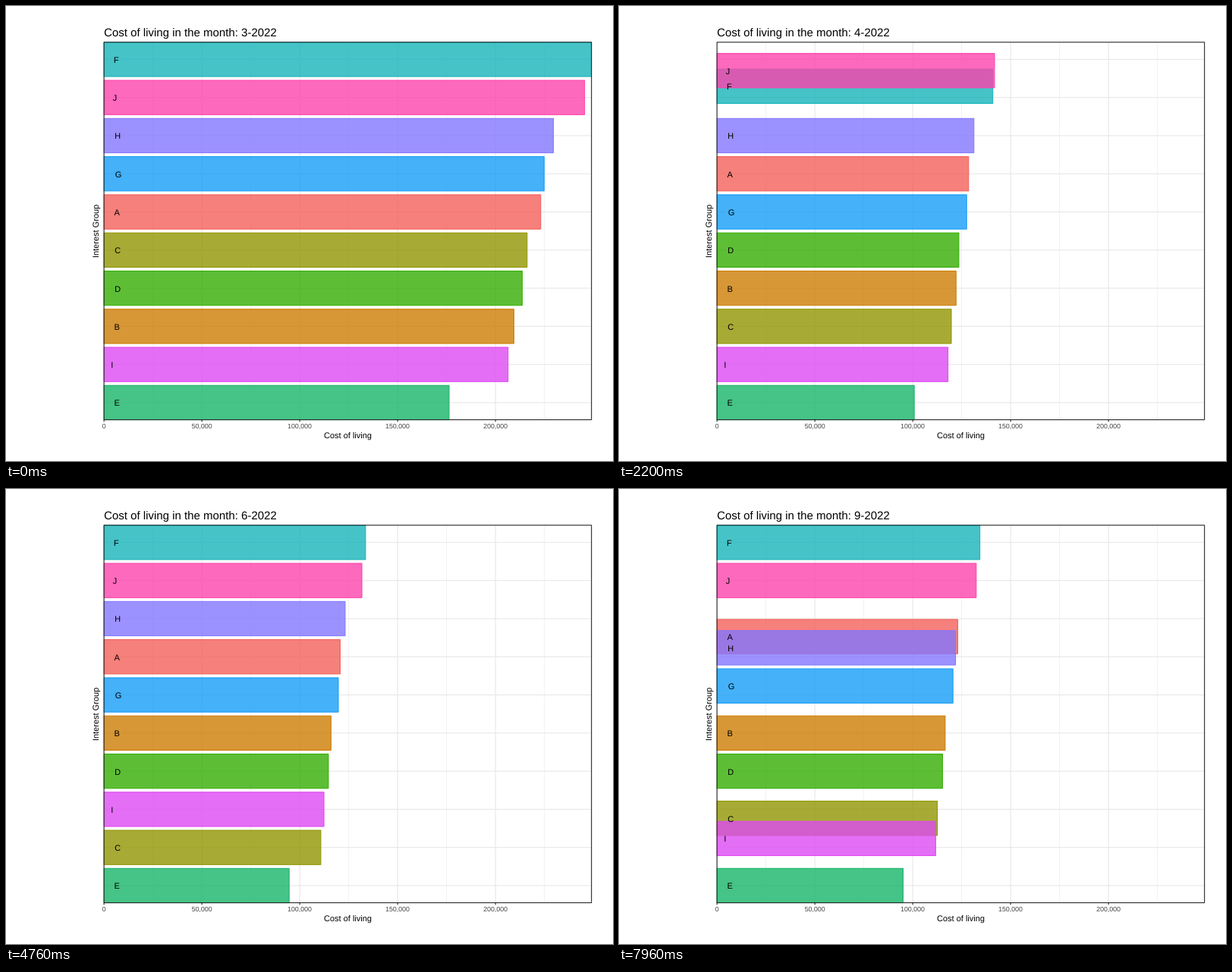
Write a matplotlib script that moves like this. It is 800 px wide and 600 px high and loops after 8 s.

```python
import math

import matplotlib.pyplot as plt
import numpy as np
from matplotlib.animation import FuncAnimation
from matplotlib.patches import PathPatch, Rectangle
from matplotlib.textpath import TextPath
from matplotlib.transforms import Affine2D

plt.rcParams["path.snap"] = False

W, H, DPI = 800, 600, 100
PX = 72 / DPI  # one pixel in points
LEFT, RIGHT, TOP, BOTTOM = 129.14, 771.65, 47.75, 545.6
PITCH = (BOTTOM - TOP) / 9.9
BAR = 0.9 * PITCH
PER_THOUSAND = 2.58
LINE = 1.07 * PX
GRID, INK = "#E7E7E7", "#222222"

FRAMES, INTERVAL = 200, 40
CYCLE, MOVE, OFFSET = 34, 17, 18  # frames per month, frames in motion, phase

PALETTE = dict(A="#F4605A", B="#CE7D05", C="#919602", D="#34AE03", E="#18B669",
               F="#16B4BA", G="#159EF8", H="#8377FF", I="#DE4AF3", J="#FD43AC")

# The leader's cost (in thousands) and the ranking of the groups, per month.
MONTHS = [(249.0, "FJHGACDBIE"), (144.4, "JFHAGDBCIE"), (137.4, "FJHAGDBCIE"),
          (133.4, "FJHAGBDICE"), (136.9, "FJHAGBDICE"), (134.6, "FJHGABDICE"),
          (134.2, "FJAHGBDCIE")]
# Every rank keeps a steady share of the leader's cost.
SHARES = [1, 0.986, 0.922, 0.903, 0.896, 0.868, 0.858, 0.841, 0.829, 0.708]

fig = plt.figure(figsize=(W / DPI, H / DPI), dpi=DPI, facecolor="white")
ax = fig.add_axes([0, 0, 1, 1])
ax.set(xlim=(0, W), ylim=(H, 0))
ax.axis("off")


def glyphs(string, size):
    return TextPath((0, 0), string, size=size, prop="Liberation Sans")


def place(patch, x, y, angle=0):
    flip = Affine2D().scale(1, -1).rotate_deg(-angle).translate(x, y)
    patch.set_transform(flip + ax.transData)


def add_text(string, size, x, y, color="black", center=False, angle=0):
    path = glyphs(string, size)
    if center:
        box = path.get_extents()
        path = path.transformed(Affine2D().translate(-(box.x0 + box.x1) / 2, 0))
    patch = PathPatch(path, facecolor=color, linewidth=0, zorder=4)
    ax.add_patch(patch)
    place(patch, x, y, angle)
    return patch


def add_line(xs, ys, color=GRID, width=LINE, zorder=1):
    ax.plot(xs, ys, color=color, lw=width, zorder=zorder, solid_capstyle="butt")


def advance(char, size):
    return glyphs(char * 2, size).get_extents().width - glyphs(char, size).get_extents().width


def row_center(rank):
    return TOP + BAR / 2 + rank * PITCH


def x_of(thousands):
    return LEFT + thousands * PER_THOUSAND


def month_title(index):
    return f"Cost of living in the month: {3 + index}-2022"


def standing(index, group):
    """Cost and rank of a group in one month."""
    leader, order = MONTHS[index]
    rank = order.index(group)
    return np.array([leader * SHARES[rank], rank])


for value in range(25, 250, 50):
    add_line([x_of(value)] * 2, [TOP, BOTTOM], width=LINE / 2)
for rank in range(len(PALETTE)):
    add_line([LEFT, RIGHT], [row_center(rank)] * 2)
for value in range(0, 250, 50):
    x = x_of(value)
    add_line([x, x], [TOP, BOTTOM])
    add_line([x, x], [BOTTOM, BOTTOM + 2.75], INK, zorder=5)
    add_text(f"{value * 1000:,}", 8.8, x, 557, "#444444", center=True)

ax.add_patch(Rectangle((LEFT, TOP), RIGHT - LEFT, BOTTOM - TOP,
                       fill=False, edgecolor=INK, linewidth=LINE, zorder=6))
add_text("Cost of living", 11, (LEFT + RIGHT) / 2, 570, center=True)
add_text("Interest Group", 11, 122, (TOP + BOTTOM) / 2, center=True, angle=90)

title = add_text(month_title(0), 15, LEFT, 40)
title_paths = [glyphs(month_title(i), 15) for i in range(len(MONTHS))]

bars, labels = {}, {}
for group, color in PALETTE.items():
    bars[group] = ax.add_patch(Rectangle(
        (LEFT, TOP), 1, BAR, facecolor=(color, 0.8), edgecolor=color,
        linewidth=LINE, zorder=2))
    labels[group] = add_text(group, 11, 0, 0)
label_x = {group: LEFT + 6.1 + advance(group, 11) for group in PALETTE}


def update(frame):
    month, step = divmod(frame + OFFSET, CYCLE)
    t = min(step, MOVE) / MOVE
    before = max(month - 1, 0)

    title.set_path(title_paths[month if t > 0.5 else before])
    for group, bar in bars.items():
        start, end = standing(before, group), standing(month, group)
        cost, rank = start + (end - start) * t
        y = row_center(rank)
        bar.set_y(y - BAR / 2)
        bar.set_width(cost * PER_THOUSAND)
        # Text baselines sit on whole pixels.
        place(labels[group], label_x[group], math.ceil(y + 3.95))
    return []


anim = FuncAnimation(fig, update, frames=FRAMES, interval=INTERVAL,
                     repeat=True, repeat_delay=0, blit=False)
plt.show()
```
